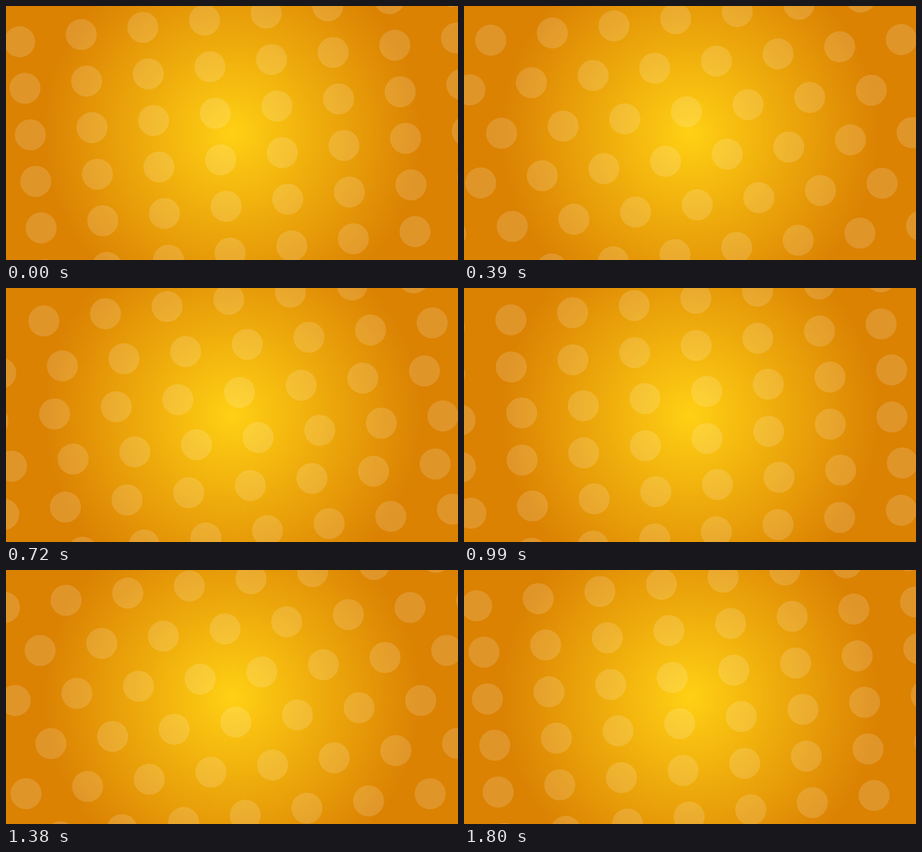
Recreate the animation shown at these times as an HTML page with a canvas. Size 998 px wide and 561 px high, loop 1830 ms.

```html
<!DOCTYPE html>
<html lang="en">
<head>
<meta charset="utf-8">
<title>Drifting dots</title>
<style>
  html, body { margin: 0; width: 100%; height: 100%; overflow: hidden; background: #db8203; }
  canvas { display: block; }
</style>
</head>
<body>
<canvas id="stage" width="998" height="561"></canvas>
<script>
const ctx = document.getElementById('stage').getContext('2d');
const W = 998, H = 561;
const LOOP = 1830, TICK = 30;
const RADIUS = 34.3;
const START = { x: 30, y: 78.9 };
const COL = { x: 136.1, y: -15.85 };
const ROW = { x: 11.9, y: 102.8 };
const ROWS = 6, FIRST = -2, LAST = 9;

const glow = ctx.createRadialGradient(499, 280.5, 0, 499, 280.5, 416);
glow.addColorStop(0, '#ffd014');
glow.addColorStop(1, '#db8203');

function draw(progress) {
  ctx.fillStyle = glow;
  ctx.fillRect(0, 0, W, H);
  ctx.fillStyle = 'rgba(255, 255, 255, 0.15)';
  for (let r = 0; r < ROWS; r++) {
    // Even rows drift right, odd rows left, one column per loop.
    let shift = r % 2 ? -progress : progress;
    // The bottom row sits slightly further left.
    if (r === ROWS - 1) shift -= 0.022;
    for (let c = FIRST; c <= LAST; c++) {
      const x = START.x + r * ROW.x + (c + shift) * COL.x;
      const y = START.y + r * ROW.y + (c + shift) * COL.y;
      ctx.beginPath();
      ctx.arc(x, y, RADIUS, 0, Math.PI * 2);
      ctx.fill();
    }
  }
}

const begin = performance.now();
function frame() {
  const t = (performance.now() - begin) % LOOP;
  draw(Math.floor(t / TICK) * TICK / LOOP);
  requestAnimationFrame(frame);
}
frame();
</script>
</body>
</html>
```
